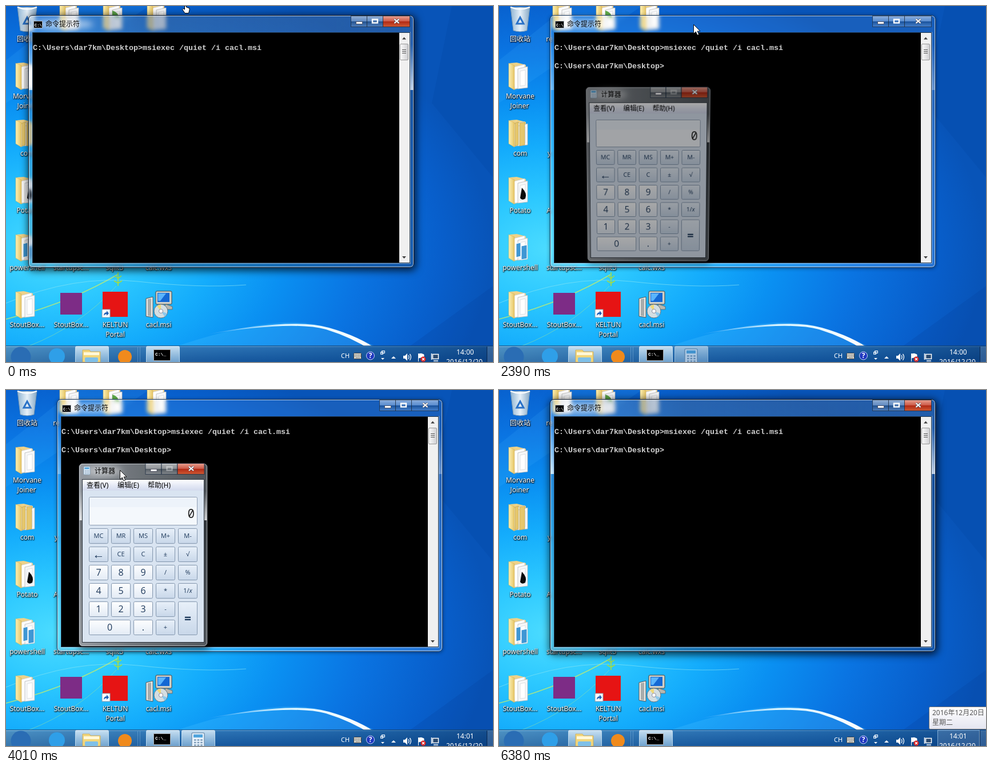
An HTML page for the animation above (6590 ms loop, 852 by 623 pixels).

```html
<!DOCTYPE html>
<html lang="zh">
<head>
<meta charset="utf-8">
<title>Desktop</title>
<style>
html, body { margin: 0; width: 100%; height: 100%; overflow: hidden; background: #0860c8; }
#stage { position: relative; width: 852px; height: 623px; overflow: hidden; }
#stage > *, #cmd > * { position: absolute; left: 0; top: 0; }
svg { display: block; overflow: visible; }
text { font: 12px "Noto Sans", "Noto Sans CJK SC", "Noto Sans CJK", sans-serif; white-space: pre; }
.label { fill: #fff; text-anchor: middle; text-shadow: 0 1px 2px #000, 1px 1px 2px #000; }
.tray { fill: #fff; }

#stage > #cmd { left: 89px; top: 16px; width: 675px; height: 442px; }
.glass { width: 675px; height: 442px; box-sizing: border-box; border: 1px solid #0d1a2b; border-radius: 7px; backdrop-filter: blur(3px); }
.glass.on {
  background: linear-gradient(#fff1 0, #fff1 50px, #fffb 130px, #1b4a8033 130px),
              linear-gradient(90deg, #fff2, #2a4f8077 35%, #2a4f8055);
  box-shadow: inset 0 0 0 1px #ffffffa0, 1.5px 3px 14px 2px #000b;
}
.glass.off {
  background: linear-gradient(#fff1 0, #fff1 50px, #fff6 130px, #cfe6ff2a 130px);
  border-color: #1d3c60;
  box-shadow: inset 0 0 0 1px #ffffffa0, 0 1px 6px #0007;
}
.con { font: bold 13.333px "Liberation Mono", monospace; fill: #d0d0d0; }

#stage > #calc { left: 148px; top: 136px; border-radius: 7px; box-shadow: 1.5px 3px 13px 1px #000a; }
.key { font-family: "Open Sans", "Noto Sans", sans-serif; fill: #1e395b; text-anchor: middle; }
</style>
</head>
<body>
<div id="stage">
  <svg id="desk" width="852" height="623">
    <defs>
      <radialGradient id="sky" gradientUnits="userSpaceOnUse" cx="0" cy="0" r="1" gradientTransform="translate(90 425) scale(760 500)">
        <stop offset="0" stop-color="#4cdcff"/><stop offset=".18" stop-color="#2cc8ff"/>
        <stop offset=".36" stop-color="#14acfc"/><stop offset=".52" stop-color="#0a90f2"/>
        <stop offset=".7" stop-color="#0a74e2"/><stop offset=".88" stop-color="#085fcc"/><stop offset="1" stop-color="#0854b8"/>
      </radialGradient>
      <linearGradient id="bar" x2="0" y2="1">
        <stop offset="0" stop-color="#5c9cd0"/><stop offset=".12" stop-color="#2f74b4"/><stop offset="1" stop-color="#17559a"/>
      </linearGradient>
      <linearGradient id="barSide"><stop offset="0" stop-color="#9fe0e8" stop-opacity=".25"/><stop offset=".5" stop-color="#0050a0" stop-opacity=".15"/><stop offset="1" stop-color="#003070" stop-opacity=".6"/></linearGradient>
      <linearGradient id="lit" x2="0" y2="1"><stop offset="0" stop-color="#e2f1fb" stop-opacity=".85"/><stop offset="1" stop-color="#9cc8e8" stop-opacity=".6"/></linearGradient>
      <linearGradient id="arc"><stop offset="0" stop-color="#fff" stop-opacity="0"/><stop offset=".45" stop-color="#d8f4ff"/><stop offset="1" stop-color="#fff"/></linearGradient>
      <linearGradient id="cover"><stop offset="0" stop-color="#fdf0b4"/><stop offset="1" stop-color="#e5c566"/></linearGradient>
      <linearGradient id="bin"><stop offset="0" stop-color="#8fb4d2"/><stop offset=".5" stop-color="#e6f0f8"/><stop offset="1" stop-color="#87a9c6"/></linearGradient>
      <linearGradient id="tip" x2="0" y2="1"><stop offset="0" stop-color="#fff"/><stop offset="1" stop-color="#e4e5f0"/></linearGradient>
      <linearGradient id="red" x2="0" y2="1">
        <stop offset="0" stop-color="#e8a090"/><stop offset=".48" stop-color="#cc5a48"/>
        <stop offset=".5" stop-color="#b02814"/><stop offset="1" stop-color="#cf5a34"/>
      </linearGradient>
      <linearGradient id="pane" x2="0" y2="1">
        <stop offset="0" stop-color="#fff" stop-opacity=".5"/><stop offset=".5" stop-color="#fff" stop-opacity=".28"/>
        <stop offset=".5" stop-color="#123" stop-opacity=".25"/><stop offset="1" stop-color="#fff" stop-opacity=".2"/>
      </linearGradient>
      <linearGradient id="thumb"><stop offset="0" stop-color="#fafafa"/><stop offset="1" stop-color="#cfcfd2"/></linearGradient>
      <linearGradient id="digit" x2="0" y2="1"><stop offset="0" stop-color="#fdfeff"/><stop offset="1" stop-color="#e3ebf5"/></linearGradient>
      <linearGradient id="op" x2="0" y2="1"><stop offset="0" stop-color="#e8f0f9"/><stop offset="1" stop-color="#c8d7e9"/></linearGradient>
      <linearGradient id="menu" x2="0" y2="1"><stop offset="0" stop-color="#fff"/><stop offset=".5" stop-color="#e6eaf6"/><stop offset="1" stop-color="#d3daed"/></linearGradient>
      <linearGradient id="smoke"><stop offset="0" stop-color="#8a9097"/><stop offset=".4" stop-color="#60666c"/><stop offset="1" stop-color="#3c4248"/></linearGradient>
      <linearGradient id="shine" x2="0" y2="1">
        <stop offset="0" stop-color="#fff" stop-opacity=".1"/><stop offset=".15" stop-color="#fff" stop-opacity=".1"/>
        <stop offset=".31" stop-color="#fff" stop-opacity=".75"/><stop offset=".31" stop-color="#000" stop-opacity=".2"/><stop offset="1" stop-color="#fff" stop-opacity=".12"/>
      </linearGradient>
      <filter id="blur" x="-50%" y="-100%" width="200%" height="300%"><feGaussianBlur stdDeviation="6"/></filter>
      <g id="folder">
        <path d="M6 2 18 1 34 5V44L14 48Z" fill="#eed288"/>
        <path d="M12 9 32 4V44L14 47Z" fill="#fdfdfd" stroke="#c8c8c8" stroke-width=".7"/>
        <path d="M20 12 37 8V45L20 47Z" fill="#f6f7f8" stroke="#b8b8b8" stroke-width=".8"/>
        <path d="M24 16 33 14V41L24 42Z" fill="#fff" stroke="#d0d4d8" stroke-width=".7"/>
        <path d="M4 2 14 6V49L4 43Z" fill="url(#cover)" stroke="#d0ab4c" stroke-width=".5"/>
      </g>
      <g id="calcIcon">
        <rect width="11" height="14" rx="1" fill="#e8f2fb" stroke="#7d9cb8" stroke-width=".8"/>
        <rect x="1.5" y="1.5" width="8" height="3" fill="#4fa4dc"/>
        <path d="M2 7h7.5M2 9.5h7.5M2 12h7.5" stroke="#7f9db9" stroke-width="1.4" stroke-dasharray="1.8 1"/>
      </g>
    </defs>
    <rect width="852" height="623" fill="url(#sky)"/>
    <path d="M0 170 250 0H120L0 95Z" fill="#48b8ff" opacity=".12"/>
    <path d="M780 0H852V300L745 170Z" fill="#04409c" opacity=".2"/>
    <path d="M700 600 852 490V623H690Z" fill="#053f98" opacity=".2"/>
    <path d="M300 595Q480 535 560 562T652 600Z" fill="#4cc4ff" opacity=".25"/>
    <path d="M350 575Q500 545 565 563Q618 578 652 603L640 603Q605 580 560 566Q500 550 350 575Z" fill="url(#arc)"/>
    <g fill="none">
      <path d="M0 548Q110 520 195 470" stroke="#c4ee6c" stroke-width="1.6" opacity=".8"/>
      <path d="M0 520Q120 470 230 482T420 488" stroke="#8fe6f0" opacity=".6"/>
      <path d="M40 595Q130 560 193 490" stroke="#a4e898" opacity=".5"/>
      <path d="M196 466V490M190 472l6 5 6-5M189 481l7 4 7-4" stroke="#a8dc3c" stroke-width="1.6"/>
    </g>
    <g id="icons"></g>
    <g id="taskbar"></g>
  </svg>

  <div id="cmd">
    <div class="glass off"></div>
    <div class="glass on"></div>
    <svg width="675" height="442">
      <ellipse cx="60" cy="16" rx="54" ry="9" fill="#fff" opacity=".55" filter="url(#blur)"/>
      <rect x="9.5" y="10.5" width="15" height="12" fill="#000" stroke="#a8b0b8"/>
      <text x="11" y="20" fill="#fff" style="font:bold 7px 'Liberation Mono',monospace">C:\</text>
      <text x="30" y="20">命令提示符</text>
      <g id="cmdButtons"></g>
      <rect x="7.5" y="30.5" width="660" height="403" fill="#000" stroke="#203448"/>
      <path d="M6.5 434.5H668.5V29.5" fill="none" stroke="#fff" opacity=".45"/>
      <rect x="649" y="31" width="18" height="402" fill="#f0f0f0"/>
      <path d="M654 42.500l3.500-4 3.500 4ZM654 422l3.500 4 3.500-4Z" fill="#404040"/>
      <rect x="650.5" y="50.500" width="14" height="28" rx="1.500" fill="url(#thumb)" stroke="#989898"/>
      <path d="M654 60.500h7M654 63.500h7M654 66.500h7" stroke="#555"/>
      <text class="con" x="8" y="61">C:\Users\dar7km\Desktop&gt;msiexec /quiet /i cacl.msi</text>
      <text class="con" id="prompt" x="8" y="93">C:\Users\dar7km\Desktop&gt;</text>
      <rect id="caret1" x="409" y="60" width="8" height="3" fill="#d0d0d0"/>
      <rect id="caret2" x="201" y="92" width="8" height="3" fill="#d0d0d0"/>
    </svg>
  </div>

  <svg id="calc" width="226" height="321"></svg>

  <svg id="tooltip" width="852" height="623">
    <rect x="752.5" y="554.5" width="104" height="39" rx="2" fill="url(#tip)" stroke="#767676"/>
    <text x="758" y="569" fill="#575757">2016年12月20日</text>
    <text x="758" y="586" fill="#575757">星期二</text>
  </svg>
  <svg id="hand" width="16" height="16">
    <path d="M312.500 0V6L310 4.500 308.500 6 313 12.500H319.500L321 7V4L315.500 2V0Z" fill="#fff" stroke="#000"/>
  </svg>
  <svg id="mouse" width="14" height="20">
    <path d="M.5.5V16.500L4.300 13 7 19 9.700 17.800 7.100 12H12Z" fill="#fff" stroke="#000" stroke-width=".9"/>
  </svg>
</div>

<script>
const $ = id => document.getElementById(id);
const rect = (x, y, w, h, fill, more = '') => `<rect x="${x}" y="${y}" width="${w}" height="${h}" fill="${fill}" ${more}/>`;
const path = (d, fill, more = '') => `<path d="${d}" fill="${fill}" ${more}/>`;
const text = (x, y, s, more = '') => `<text x="${x}" y="${y}" ${more}>${s}</text>`;
const label = (x, y, s) => text(x, y, s, 'class="label"');
const folder = (cx, y) => `<use href="#folder" x="${cx - 24}" y="${y}"/>`;

// Caption buttons: minimise, maximise, close
function buttons(x, y, closeClass, dim) {
  const edge = 'stroke="#1c2c40" stroke-opacity=".75"';
  return rect(x, y, 28, 19, 'url(#pane)', edge) + rect(x + 28, y, 28, 19, 'url(#pane)', edge) +
    rect(x + 56, y, 47, 19, 'url(#pane)', edge) + rect(x + 56, y, 47, 19, 'url(#red)', `class="${closeClass}" ` + edge) +
    rect(x + 9, y + 10, 11, 4, '#fff', 'stroke="#445" stroke-width=".8"') +
    rect(x + 37.5, y + 6, 9, 6, 'none', `stroke="#fff" stroke-width="2.4" opacity="${dim}"`) +
    path(`M${x + 76} ${y + 5.5}l8 7m0-7l-8 7`, 'none', 'stroke="#445" stroke-width="3.6"') +
    path(`M${x + 76} ${y + 5.5}l8 7m0-7l-8 7`, 'none', 'stroke="#fff" stroke-width="2.2"');
}

function drawIcons() {
  const bin = path('M20 2H54L49 43Q37 47 25 43Z', 'url(#bin)', 'stroke="#6f93b3"') +
    path('M20 2Q37 9 54 2', 'none', 'stroke="#fff" stroke-width="2"') +
    path('M31 31l6-11 6 11Z', 'none', 'stroke="#2a72c8" stroke-width="3"');
  const extras = path('M28 205l6-2v40l-6 2Zm8 0l9-2v40l-9 2Z', '#e6c76c', 'stroke="#b89a48" stroke-width=".6"') +
    path('M40 318Q50 328 46 337 40 341 37 336Z', '#0a0a0a') +
    path('M30 416l8-2v24l-8 2ZM39 420l10-2v24l-10 2Z', '#3f97d4', 'stroke="#fff"');
  const packed = rect(95, 502, 38, 38, '#7d2c86');
  const tunnel = rect(169, 500, 44, 44, '#e61414') + rect(168, 531, 14, 14, '#fff', 'stroke="#8899aa"') +
    path('M171 542q0-6 5-6v-3l4 5-4 4v-3q-3 0-5 3Z', '#1f5fb4');
  const setup = path('M245 512l12-3v36l-12-2Z', '#e8e8e4', 'stroke="#555"') + path('M248 513l6-1v31l-6-1Z', '#a8acac') +
    rect(262, 499, 28, 23, '#d0d0c8', 'rx="2" stroke="#444"') + rect(265, 502, 21, 16, '#1468d4') +
    path('M266 503h14l-10 13h-4Z', '#5ab4fc') + path('M280 522l11 4v5h-19Z', '#b8b8b0', 'stroke="#555" stroke-width=".7"') +
    '<circle cx="271" cy="534" r="12" fill="#d4dee2" stroke="#66727a"/>' +
    path('M271 534L264 525 271 522.500Z', '#f0d878') + path('M271 534l11 4-4 6Z', '#8cc8ec') +
    '<circle cx="271" cy="534" r="3.500" fill="#fff" stroke="#889"/>';
  const folders = [[37, 98], [37, 198], [37, 298], [37, 398], [37, 498], [114, -5], [190, -5], [267, -5]];
  const labels = [[37, 62, '回收站'], [37, 162, 'Morvane'], [36, 179, 'Joiner'], [37, 262, 'com'], [37, 362, 'Potato'],
    [37, 462, 'powershell'], [37, 562, 'StoutBox...'], [114, 462, 'startupsc...'], [190, 462, 'sqlit3'], [267, 462, 'calc.wxs'],
    [114, 562, 'StoutBox...'], [191, 562, 'KELTUN'], [191, 579, 'Portal'], [267, 562, 'cacl.msi'],
    [88, 62, 're'], [88, 262, 'y'], [87, 362, 'A']];
  return bin + folders.map(f => folder(...f)).join('') + path('M186 8q10 2 12 14l-12-6Z', '#5da848') +
    extras + packed + tunnel + setup + labels.map(l => label(...l)).join('');
}

function drawTaskbar() {
  const task = x => rect(x + .5, 595.5, 58, 30, 'url(#lit)', 'rx="2" stroke="#d4eaf8" stroke-opacity=".8"');
  const ball = (x, y, r, c) => `<circle cx="${x}" cy="${y}" r="${r}" fill="${c}"/>`;
  const apps = ball(26, 614, 17.5, '#2a6db4') + ball(89, 613, 14, '#2f9fe8') + task(121) +
    path('M134 602h12l2 3h17v18H134Z', '#f2d67c', 'stroke="#c9a347" stroke-width=".7"') + rect(136, 606, 27, 5, '#fff8d8') +
    rect(138, 615, 23, 8, '#7fc0e8', 'rx="2"') +
    path('M230.500 597V623M234.500 597V623', 'none', 'stroke="#a8cfee" opacity=".35"') + ball(208, 614, 12, '#f08a1c') + task(245) +
    rect(258.5, 601.5, 29, 19, '#000', 'stroke="#a8a8a8"') +
    text(261, 612, 'C:\\_', 'fill="#fff" style="font:bold 8px \'Liberation Mono\',monospace"') +
    `<g id="calcTask">${task(307)}<use href="#calcIcon" transform="translate(325 600) scale(2 1.8)"/></g>`;
  const ime = text(586, 616, 'CH', 'class="tray" style="font-size:11px"') +
    rect(608.5, 607.5, 13, 10, '#d8d8d0', 'rx="1" stroke="#444"') +
    path('M610 610.500h11M610 613h11M612 615.500h7', 'none', 'stroke="#555" stroke-dasharray="1.500 1"') +
    '<circle cx="637.500" cy="612" r="7" fill="#2038c0" stroke="#c8d4f8"/>' +
    text(637.5, 616, '?', 'class="tray" text-anchor="middle" style="font-weight:bold"');
  const tray = path('M657.500 603.500h5v4h-5ZM655.500 605.500h4v4h-4Z', '#3a78b8', 'stroke="#fff"') + path('M656 616h6l-3 3Z', '#fff') +
    path('M674 617l4-4 4 4Z', '#fff') + path('M695 612h3l4-4v13l-4-4h-3Z', '#fff') +
    path('M704 611q2 3 0 7M706.500 609q4 5 0 11', 'none', 'stroke="#fff" stroke-width="1.300"') +
    path('M721.500 608V622M722 609q4-2 9 1v6q-5-2-9 0', '#fff', 'stroke="#fff"') + ball(730, 618, 4.5, '#d82020') +
    path('M728 616l4 4m0-4l-4 4', 'none', 'stroke="#fff" stroke-width="1.300"') +
    rect(746.5, 609.5, 10, 8, '#2a4a70', 'stroke="#fff" stroke-width="1.500"') + path('M748 621h8M744.500 608v11', 'none', 'stroke="#fff" stroke-width="1.500"');
  const clock = `<g id="hover">${rect(767.5, 595.5, 73, 30, '#fff', 'fill-opacity=".14" stroke="#bfe0f8" stroke-opacity=".6"')}</g>` +
    text(788, 610, '14:00', 'class="tray" id="min0"') + text(788, 610, '14:01', 'class="tray" id="min1"') +
    text(770, 627, '2016/12/20', 'class="tray"') +
    rect(841, 596, 11, 27, '#fff', 'fill-opacity=".15"') + path('M841.500 596V623', 'none', 'stroke="#0a2850"');
  return rect(0, 595, 852, 28, 'url(#bar)') + rect(0, 595, 852, 28, 'url(#barSide)') +
    rect(0, 594, 852, 1, '#0d3a6a', 'opacity=".7"') + apps + `<g id="ime">${ime}</g>` + tray + clock;
}

function drawCalc() {
  const rows = ['MC MR MS M+ M-', '← CE C ± √', '7 8 9 / %', '4 5 6 * 1/x', '1 2 3 - =', '0 _ . +'];
  const sizes = { '=': 21, '←': 21 };
  let keys = '';
  rows.forEach((row, j) => row.split(' ').forEach((k, i) => {
    if (k === '_') return;
    const x = 18 + 39 * i, y = 114 + 32 * j, w = k === '0' ? 73 : 34, h = k === '=' ? 59 : 27;
    const num = /^[\d.]$/.test(k), size = sizes[k] || (num ? 16 : 11);
    const name = k === '1/x' ? '1/<tspan font-style="italic">x</tspan>' : k;
    keys += rect(x + .5, y + .5, w - 1, h - 1, num ? 'url(#digit)' : 'url(#op)', 'rx="2" stroke="#8497ae"') +
      text(x + w / 2, y + h / 2 + size * .36, name, `class="key" style="font-size:${size}px;font-weight:${sizes[k] ? 700 : 400}"`);
  }));
  return rect(.5, .5, 225, 320, 'url(#smoke)', 'rx="6.500" stroke="#1c2026"') + rect(1.5, 1.5, 223, 318, 'url(#shine)', 'rx="5.500" stroke="#fff" stroke-opacity=".55"') +
    '<ellipse cx="45" cy="14" rx="30" ry="8" fill="#fff" opacity=".5" filter="url(#blur)"/>' +
    '<use href="#calcIcon" x="9" y="6"/>' + text(28, 18, '计算器') + buttons(117, .5, 'hot', .4) +
    rect(6.5, 28.5, 213, 285, '#d9e4f1', 'stroke="#2c333c"') + rect(7, 29, 212, 19, 'url(#menu)') +
    text(14, 43, '查看(V)') + text(68, 43, '编辑(E)') + text(121, 43, '帮助(H)') +
    rect(18.5, 59.5, 189, 49, '#f4f8fc', 'rx="2" stroke="#8c9cb2"') + rect(20, 61, 186, 16, '#edf3fa') +
    text(203, 96, '0', 'text-anchor="end" fill="#222" style="font:21px \'Noto Sans Mono\',\'DejaVu Sans Mono\',monospace"') + keys;
}

$('icons').innerHTML = drawIcons();
$('taskbar').innerHTML = drawTaskbar();
$('cmdButtons').innerHTML = buttons(564.5, 1.5, 'armed', 1);
$('calc').innerHTML = drawCalc();

// Builds looping stepped keyframes from { milliseconds: value }
const LOOP = 6590;
let css = '';
function track(target, steps, toCss) {
  const name = 'k' + css.length;
  const frames = Object.entries(steps).map(([ms, v]) => `${(ms / LOOP * 100).toFixed(4)}%{${toCss(v)}}`);
  css += `@keyframes ${name}{${frames.join('')}}${target}{animation:${name} ${LOOP}ms step-end infinite}`;
}
const show = v => `opacity:${v}`;
const move = ([x, y]) => `transform:translate(${x}px,${y}px)`;
const pose = ([x, y, alpha = 1, scale = 1, tilt = 0]) =>
  `opacity:${alpha};transform:translate(${x}px,${y}px) perspective(1000px) rotateX(${tilt}deg) scale(${scale})`;

track('#cmd', { 0: [-50, 0], 1040: [-30, 0], 1190: [-5, 0], 1340: [0, 0] }, move);
track('.glass.on', { 0: 1, 2390: 0, 5180: 1 }, show);
track('.glass.off', { 0: 0, 2390: 1, 5180: 0 }, show);
track('.armed', { 0: 1, 2090: 0, 5180: 1 }, show);
track('#prompt', { 0: 0, 1940: 1 }, show);
track('#caret1', { 0: 0, 150: 1, 600: 0, 1190: 1, 1640: 0 }, show);
track('#caret2', { 0: 0, 1940: 1, 2090: 0, 5480: 1, 6080: 0 }, show);
track('#calc', {
  0: [0, 0, 0], 2390: [0, 0, .66, .957, -5.3], 2540: [0, 0], 3720: [-35, -10], 3870: [-93, -15], 4010: [-21, -8],
  5180: [-20, -7, .86, .984, -1], 5330: [0, 0, 0]
}, pose);
track('#calcTask', { 0: 0, 2390: .7, 2540: 1, 5180: .35, 5330: 0 }, show);
track('#ime', { 0: 1, 5180: 0, 5330: 1 }, show);
track('#min0', { 0: 1, 2680: 0 }, show);
track('#min1', { 0: 0, 2680: 1 }, show);
track('#hover', { 0: 0, 5780: 1 }, show);
track('#tooltip', { 0: 0, 6230: .6, 6380: 1 }, show);
track('#hand', { 0: 1, 150: 0 }, show);
track('#mouse', {
  0: [-50, 0], 150: [254, 2], 300: [288, 12], 600: [290, 22], 740: [291, 32], 1040: [311, 32], 1190: [336, 32], 1340: [341, 32],
  1490: [340, 32], 2540: [335, 45], 2680: [318, 75], 2830: [290, 100], 2970: [272, 117], 3120: [248, 132], 3420: [219, 151],
  3720: [185, 138], 3870: [127, 133], 4010: [199, 140], 4160: [205, 140], 4300: [222, 139], 4450: [245, 138], 4600: [270, 137],
  4740: [292, 136], 4890: [308, 135], 5040: [315, 134], 5330: [380, 210], 5480: [530, 370], 5630: [690, 530], 5780: [790, 604], 5930: [795, 640]
}, move);
document.head.appendChild(document.createElement('style')).textContent = css;
</script>
</body>
</html>
```
